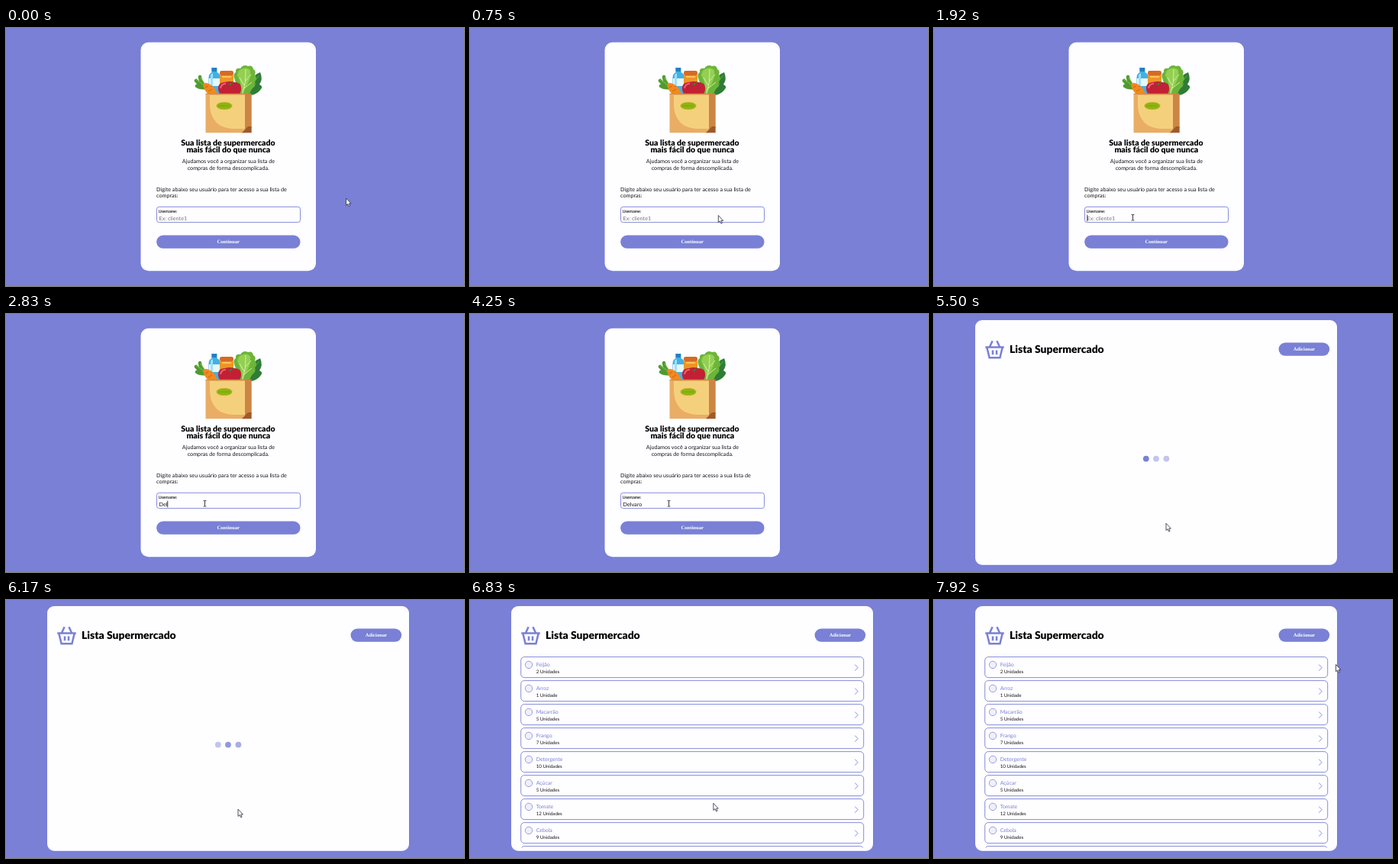
Animation, 600 px wide and 338 px high, one loop 8 s. Source, as an HTML page:

```html
<!DOCTYPE html>
<html lang="pt-BR">
<head>
<meta charset="utf-8">
<title>Lista Supermercado</title>
<style>
  html, body { margin: 0; width: 100%; height: 100%; overflow: hidden; background: #7980d6; }
  svg { display: block; width: 100vw; height: 100vh; }
  text { font: 7.23px Lato, "Open Sans", sans-serif; text-rendering: geometricPrecision; fill: #161618; white-space: pre; }
  .mid { text-anchor: middle; }
  .head { font-size: 10.5px; font-weight: 900; fill: #000; }
  .title { font-size: 13.9px; font-weight: 900; fill: #000; }
  .tag { font-size: 5.2px; stroke: #161618; stroke-width: .12px; }
  .btn { font: bold 6.65px "Liberation Serif", Times, serif; fill: #fff; text-anchor: middle; }
  .item { font-size: 6.95px; fill: #7980d6; }
  .qty { font-size: 6.2px; }
  .card { fill: #fefdff; }
  .fill { fill: #7980d6; }
  .line { fill: none; stroke: #7980d6; stroke-width: .9; }
</style>
</head>
<body>
<svg viewBox="0 0 600 338">
  <defs>
    <clipPath id="view"><rect x="60" y="70" width="462" height="254.5"/></clipPath>
  </defs>

  <g id="login">
    <rect class="card" x="176.5" y="18.7" width="229.5" height="299.5" rx="10"/>

    <!-- groceries -->
    <g fill="none" stroke-linecap="round">
      <path d="M262 77Q255 76 249 69M262 77Q255 73 254 64M262 78Q254 79 250 76" stroke="#4f9a32" stroke-width="4.5"/>
      <path d="M261 76L250 68M262 76L255 65" stroke="#7cba42" stroke-width="1.2"/>
    </g>
    <path d="M316 86Q316 65 333 58Q337 67 332 74Q337 76 334 80Q330 86 322 88Z" fill="#2f7d35"/>
    <path d="M319 86Q323 71 332 62" fill="none" stroke="#61a548" stroke-width="1"/>
    <path d="M299 87Q304 76 299 66Q297 60 301 58Q300 52 307 53Q311 47 317 50Q323 48 324 54Q328 56 326 61Q330 66 326 70Q328 76 323 79L317 88Z" fill="#6cb53a"/>
    <path d="M303 62Q304 54 311 53Q317 51 320 56Q321 66 315 76L309 87Q309 72 303 62Z" fill="#93d052"/>
    <path d="M310 86Q315 70 314 54M312 75L306 65M314 69L321 61M312 79L322 71" fill="none" stroke="#d9eda6" stroke-width="1"/>
    <path d="M269.5 52H276.5V58Q281 60 281 65V87H265.5V65Q265.5 60 269.5 58Z" fill="#42b0e4"/>
    <path d="M269.5 52H276V57H269.5Z" fill="#247fc0"/>
    <path d="M266 66H281V76H266Z" fill="#e5f6fc"/>
    <path d="M268 62Q268 60 271 59V85H268Z" fill="#a0def5"/>
    <rect x="280" y="60" width="18" height="27" rx="4" fill="#ee9427"/>
    <rect x="280" y="56" width="18" height="6" rx="2.5" fill="#d66b21"/>
    <path d="M283 64H295" stroke="#ffc45c" stroke-width="2"/>
    <path d="M258 75Q260 70 266 73Q274 77 277 87H265Q260 82 258 75Z" fill="#f28a1c"/>
    <path d="M261 78L265 76M265 83L270 80M268 77L270 76" stroke="#c95e13" stroke-width=".9"/>
    <path d="M278 81Q277 71 287 71Q293 69 299 71Q309 71 308 81Q307 87 302 88H284Q279 87 278 81Z" fill="#c31f35"/>
    <path d="M281 79Q282 73 288 73" fill="none" stroke="#ee6670" stroke-width="1.8"/>
    <path d="M289 71L293 73L298 70L294 76Z" fill="#397d2d"/>

    <!-- paper bag -->
    <path d="M261.5 86H313V137.3H261.5Z" fill="#e9ad65"/>
    <path d="M267 88H313V132H296Q269 130 267 102Z" fill="#f5d07c"/>
    <path d="M313 86H321.7V130L313 137.3Z" fill="#cc8544"/>
    <path d="M321.7 129V137.3H309L317 129Z" fill="#9e5a2b"/>
    <path d="M261.5 86.3H321.7" stroke="#c88443" stroke-width="1.1"/>
    <ellipse cx="286" cy="102" rx="10.3" ry="4.8" fill="#8db510" stroke="#d6b43e" stroke-width=".7"/>
    <path d="M279 102H293" stroke="#759c0c" stroke-width="1" stroke-dasharray="2 .7"/>

    <text class="head mid" x="291" y="153.6">Sua lista de supermercado</text>
    <text class="head mid" x="291.3" y="162.6">mais fácil do que nunca</text>
    <text class="mid" x="291.4" y="177.4">Ajudamos você a organizar sua lista de</text>
    <text class="mid" x="291.2" y="185.9">compras de forma descomplicada.</text>
    <text x="197" y="214">Digite abaixo seu usuário para ter acesso a sua lista de</text>
    <text x="197" y="222.4">compras:</text>
    <rect class="line" x="197.5" y="234.3" width="188" height="20.3" rx="3"/>
    <text class="tag" x="199.8" y="241.7">Username:</text>
    <text id="field" x="200.5" y="251.8"></text>
    <path id="caret" d="M0 244.7V253.3" stroke="#111" stroke-width=".8"/>
    <rect class="fill" x="197.2" y="271.6" width="188.3" height="17.2" rx="8.6"/>
    <text class="btn" x="291.2" y="282.2">Continuar</text>
  </g>

  <g id="list">
    <rect class="card" x="54" y="8" width="474" height="320.7" rx="9"/>
    <path class="line" d="M67.3 43.6H91.7M69.3 43.6L72.6 57.2H86.4L89.7 43.6M73 43L76.6 35.2M86 43L82.4 35.2M77 47.5V53.2M82 47.5V53.2" style="stroke-width:2.5"/>
    <text class="title" x="99" y="50.6">Lista Supermercado</text>
    <rect class="fill" x="451.5" y="37.4" width="66.7" height="17.4" rx="8.7"/>
    <text class="btn" x="485" y="48.2">Adicionar</text>
    <g id="dots"></g>
    <g id="rows" clip-path="url(#view)"></g>
  </g>

  <path id="arrow" d="M0 0V9.3L2.1 7.4L3.6 10.7L5.1 10L3.7 6.9H6.4Z" fill="#fff" stroke="#26263a" stroke-width=".8"/>
  <path id="beam" d="M-1.8-3.8H-.5L0-3.4L.5-3.8H1.8M0-3.4V3.4M-1.8 3.8H-.5L0 3.4L.5 3.8H1.8" fill="none" stroke="#222" stroke-width=".9"/>
</svg>

<script>
const LOOP = 8000, FOCUS = 1920, BLUR = 5170, OPEN = 5500, LOADED = 6250;
const NAME = "Delvaro", HINT = "Ex: cliente1";
const KEYS = [2420, 2580, 2750, 3080, 3500, 3580, 3750];
const ITEMS = [["Feijão", 2], ["Arroz", 1], ["Macarrão", 5], ["Frango", 7],
  ["Detergente", 10], ["Açúcar", 5], ["Tomate", 12], ["Cebola", 9]];
// pointer path: time, x, y
const PATH = [
  [0, 445.7, 223], [80, 442, 223.5], [400, 392, 233], [750, 325.5, 245.5],
  [1000, 285, 248], [1300, 260.5, 248.3], [4250, 260.5, 248.3], [4600, 282, 262],
  [5000, 304, 274.3], [6750, 304, 274], [7000, 350, 250], [7330, 425, 202],
  [7420, 425, 202], [7580, 488, 140], [7750, 558, 82], [7920, 526.5, 84.5], [8000, 526.5, 84.5]
];

const el = id => document.getElementById(id);
const show = (node, on) => node.style.display = on ? "" : "none";
const field = el("field"), caret = el("caret"), arrow = el("arrow"), beam = el("beam");

el("dots").innerHTML = [277.8, 291, 304.4].map(x => `<circle class="fill" cx="${x}" cy="189.6" r="3.9"/>`).join("");
const dots = [...el("dots").children];

const rowBox = y => `<rect class="line" x="66.7" y="${y}" width="449" height="27" rx="4.5"/>`;
el("rows").innerHTML = ITEMS.map(([name, n], i) => {
  const y = 74.6 + i * 31;
  return `${rowBox(y)}
    <circle cx="77" cy="${y + 10.3}" r="4.7" fill="#f0effa" stroke="#8589d8" stroke-width=".8"/>
    <text class="item" x="86.7" y="${y + 12.2}">${name}</text>
    <text class="qty" x="86.7" y="${y + 20.9}">${n} Unidade${n > 1 ? "s" : ""}</text>
    <path class="line" d="M504.3 ${y + 10}l3.8 4l-3.8 4"/>`;
}).join("") + rowBox(74.6 + ITEMS.length * 31);

function pointer(t) {
  const i = PATH.findIndex(p => p[0] > t);
  const [a, b] = [PATH[i - 1], PATH[i]];
  const k = (t - a[0]) / (b[0] - a[0]);
  return [a[1] + (b[1] - a[1]) * k, a[2] + (b[2] - a[2]) * k];
}

function drawField(t) {
  const count = KEYS.filter(k => k <= t).length;
  const text = count ? NAME.slice(0, count) : HINT;
  if (field.textContent !== text) field.textContent = text;
  field.style.fill = count ? "#161618" : "#75757c";
  const since = t - (count ? KEYS[count - 1] : FOCUS);
  show(caret, t >= FOCUS && t < BLUR && since % 1000 < 420 + 80 * (count < 7));
  const x = 200.8 + (count ? field.getComputedTextLength() : 0);
  caret.setAttribute("transform", `translate(${x})`);
}

// each dot lights in turn, then fades over half a second
function drawDots(t) {
  dots.forEach((dot, i) => {
    const off = Math.abs((t - OPEN) / 500 - i);
    dot.style.opacity = 1 - .55 * Math.min(1, off);
  });
}

function frame(now) {
  const t = now % LOOP, inList = t >= OPEN;
  show(el("login"), !inList);
  show(el("list"), inList);
  show(el("dots"), t < LOADED);
  show(el("rows"), t >= LOADED);
  if (inList) drawDots(t); else drawField(t);

  const typing = t > 830 && t < 4500;
  const [x, y] = pointer(t);
  show(arrow, !typing);
  show(beam, typing);
  (typing ? beam : arrow).setAttribute("transform", `translate(${x} ${y})`);
}

const start = performance.now();
(function tick() {
  frame(performance.now() - start);
  requestAnimationFrame(tick);
})();
</script>
</body>
</html>
```
